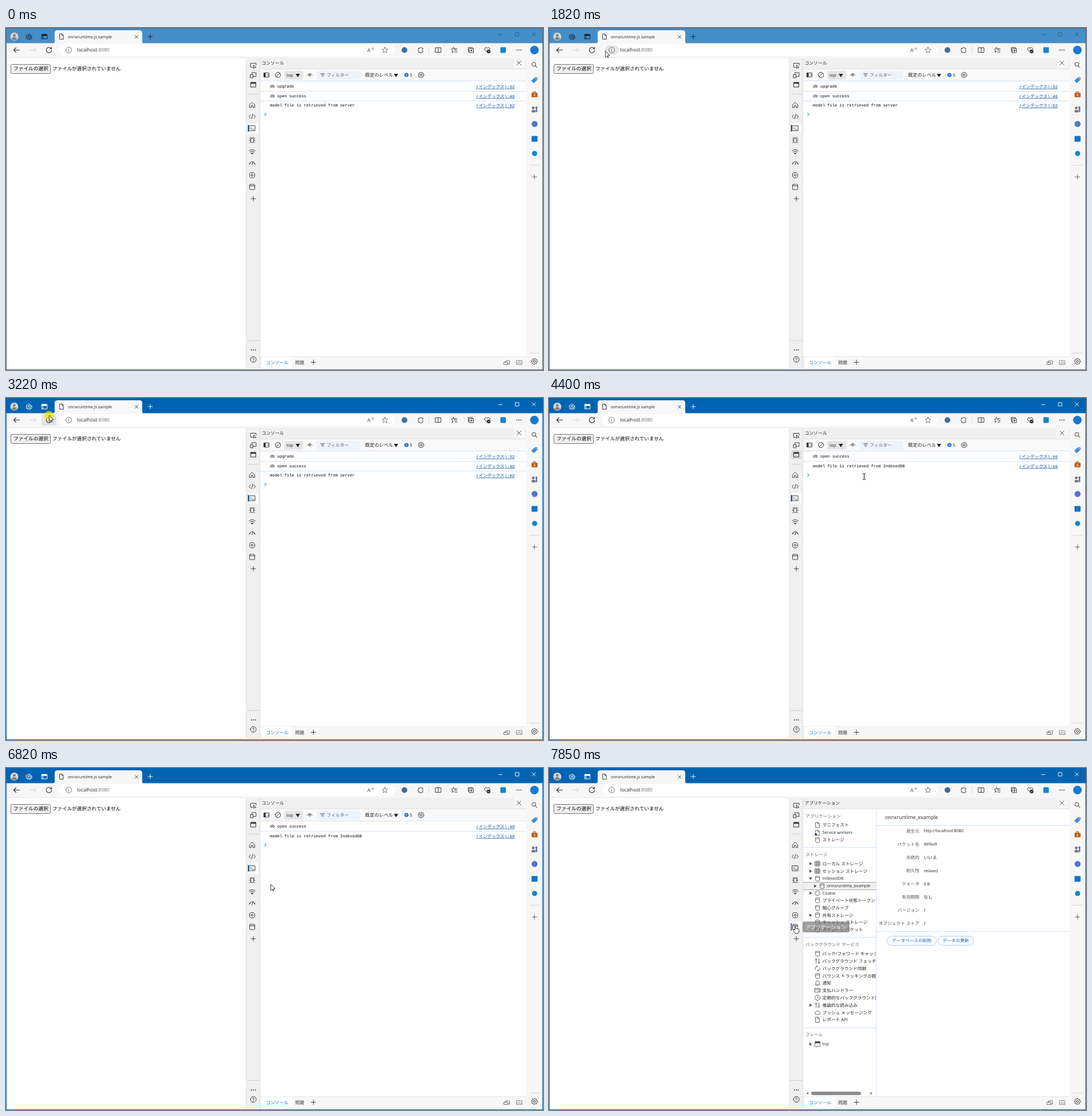
An HTML page that plays this animation: 938 by 597 pixels, repeating every 8 s.

```html
<!DOCTYPE html>
<html lang="ja">
<head>
<meta charset="utf-8">
<title>Browser storage demo</title>
<style>
html, body { margin: 0; width: 100%; height: 100%; overflow: hidden; background: #f7f7f7; }
svg { position: absolute; left: 0; top: 0; display: block; }
text { font-family: 'Open Sans', 'Noto Sans CJK JP', 'Noto Sans CJK', sans-serif; white-space: pre; text-rendering: geometricPrecision; }
.mono { font-family: 'Liberation Mono', 'Noto Sans CJK JP', 'Noto Sans CJK', monospace; }
.link { text-decoration: underline; }
.tight { font-feature-settings: 'palt'; }
</style>
</head>
<body>
<script>
const LOOP = 8000;
const INK = '#2b2b2b', BLUE = '#004f9c', LINE = '#d3e2f5', GREY = '#f0f0f0', BAR = '#f7f7f7';

const latin = s => /^[\x20-\x7e]+$/.test(s);
const box = (x, y, w, h, fill, extra = '') =>
  `<rect x="${x}" y="${y}" width="${w}" height="${h}" fill="${fill}" ${extra}/>`;
const outline = (x, y, w, h, fill, stroke, r = 0, extra = '') =>
  box(x + .5, y + .5, w - 1, h - 1, fill, `stroke="${stroke}" rx="${r}" ${extra}`);
const dot = (x, y, r, fill) => `<circle cx="${x}" cy="${y}" r="${r}" fill="${fill}"/>`;
// y is the middle of the line of text
const label = (x, y, s, size = 7.7, fill = '#222', extra = '') =>
  `<text x="${x}" y="${y + size * (latin(s) ? .33 : .37)}" font-size="${size}" fill="${fill}" ${extra}>${s}</text>`;
const icon = (x, y, d, stroke = INK, w = .9, fill = 'none') =>
  `<path transform="translate(${x} ${y})" d="${d}" fill="${fill}" stroke="${stroke}" stroke-width="${w}" stroke-linecap="round" stroke-linejoin="round"/>`;
const group = (id, ...parts) => `<g id="${id}">${parts.join('')}</g>`;
const ring = r => `M${-r} 0a${r} ${r} 0 1 0 ${2 * r} 0a${r} ${r} 0 1 0 ${-2 * r} 0`;
const frame = (w, h) => `M${-w} ${-h}h${2 * w}v${2 * h}h${-2 * w}z`;
const gear = r => {
  let d = ring(r * .36);
  for (let i = 0; i <= 32; i++) {
    const a = i * Math.PI / 16, q = i % 4 < 2 ? r : r * .78;
    d += `${i ? 'L' : 'M'}${(q * Math.cos(a)).toFixed(2)} ${(q * Math.sin(a)).toFixed(2)}`;
  }
  return d;
};

const PLUS = 'M-4 0H4M0-4V4', CROSS = 'M-3.5-3.5L3.5 3.5M3.5-3.5L-3.5 3.5';
const DOC = 'M-3-4.5H.8L3.2-2V4.5H-3zM.8-4.5V-2H3.2';
const CYL = 'M-3.5-3c0-1.9 7-1.9 7 0v6c0 1.9-7 1.9-7 0zM-3.5-3c0 1.9 7 1.9 7 0';
const GRID = frame(4, 4) + 'M-1.4-4V4M1.4-4V4M-4-1.4H4M-4 1.4H4';
const WINDOW = 'M-3.5-4.5h7q1 0 1 1v7q0 1-1 1h-7q-1 0-1-1v-7q0-1 1-1zM-4.5-2h9';
const ARROWS = 'M-2.5 4V-4L-4.5-2M-2.5-4L-.8-2M2.5-4V4L.8 2M2.5 4L4.5 2';
const SYNC = 'M-3.5 2.2A4 4 0 0 1 0-4M-1.5-5L0-4-1.5-2.5M3.5-2.2A4 4 0 0 1 0 4M1.5 5L0 4 1.5 2.5';
const BELL = 'M-4 2.5L-3 1V-1a3 3 0 0 1 6 0V1L4 2.5zM-1 4H1';
const CARD = frame(4.5, 3.2) + 'M-4.5-1h9M1.5 1.5H3';
const CLOCK = ring(4.5) + 'M0-2.5V.5H2.5';
const CLOUD = 'M-3 3a2.2 2.2 0 0 1 .2-4.2a3 3 0 0 1 5.6 0A2.2 2.2 0 0 1 3 3z';
const COOKIE = ring(4.3) + 'M-1.6-1.5h.2M1.4-1h.2M-1 1.7h.2M1.5 2h.2';

const titleBar = () => [
  box(0, 0, 938, 27, '#468ec8', 'id="strip"'),
  '<path d="M82 27q3 0 3-3V9q0-5 5-5H233q5 0 5 5V24q0 3 3 3z" fill="#f7f7f7"/>',
  dot(14.5, 15, 7, '#d9d6d3'), dot(14.5, 13, 2.4, '#87817c'),
  '<path d="M10 19.5q0-3.5 4.5-3.5t4.5 3.5q-4.5 3.5-9 0z" fill="#87817c"/>',
  group('tools',
    icon(40, 15, 'M-4.5-2L0-4.5 3-3M-4.5-2V3L-1 4.8M-1.5-.8L2-2.6 5-.8V3L2 4.8-1.5 3zM-1.5-.8L2 1 5-.8M2 1V4.8', 'currentColor'),
    icon(67, 15, 'M-4-4H4q.8 0 .8.8V4H-4.8V-3.2q0-.8.8-.8zM-2.5-1.5V4', 'currentColor', 1),
    box(62.5, 11, 9, 2.8, 'currentColor'), icon(252, 15, PLUS, 'currentColor')),
  icon(97, 15, DOC), label(108, 15.3, 'onnxruntime.js sample', 7.2),
  icon(228, 15.5, 'M-2.5-2.5L2.5 2.5M2.5-2.5L-2.5 2.5'),
  group('controls', icon(863.5, 11.5, 'M-3 0H3', 'currentColor'), icon(893, 11, frame(3, 3), 'currentColor'),
    icon(922, 11, 'M-3-3L3 3M3-3L-3 3', 'currentColor'))
].join('');

const toolbar = () => [
  box(1, 26.5, 936, 569.5, BAR),
  box(93, 28, 586, 21, '#fff', 'rx="10"'),
  box(62, 29, 26, 19, '#e3e3e3', 'rx="3" id="reloadHover"'),
  box(97, 30, 25, 17, '#e6e6e6', 'rx="8.5" id="infoHover"'),
  icon(18.5, 38.5, 'M5 0H-5M-1-4L-5 0-1 4', INK, 1.1),
  icon(47, 38.5, 'M-5 0H5M1-4L5 0 1 4', '#cfcfcf'),
  icon(75, 38.5, 'M4-2.5A4.7 4.7 0 1 0 4.7 0M4.4-5V-2.3H1.7', INK, 1.1),
  icon(109.5, 38.5, ring(5) + 'M0-.5V2.5M0-2.4V-2.3', '#666'),
  label(124, 38.5, 'localhost<tspan fill="#707070">:8080</tspan>', 8.45),
  label(631, 39, 'A', 9, '#444'), icon(639, 36, 'M0-1Q1 0 0 1M2-2Q3.7 0 2 2', '#444', .7),
  icon(662, 38.5, 'M0-5L1.5-1.7 5-1.3 2.4 1.1 3.1 4.6 0 2.8-3.1 4.6-2.4 1.1-5-1.3-1.5-1.7z', '#555', .8),
  dot(696, 38.5, 5, '#3f6f9c'),
  icon(724, 38.5, 'M-3.5-3.2H-1a1.5 1.5 0 0 1 3 0H4V-1.2a1.6 1.6 0 0 0 0 2.6V3.8H2a1.5 1.5 0 0 1-3 0H-3.5V1.5a1.5 1.5 0 0 1 0-2.8z'),
  box(738, 32, 1, 13, '#dedede'),
  icon(755, 38.5, frame(4.8, 4) + 'M0-4V4'),
  icon(783, 38.5, 'M-1.5-4.5L-.3-1.8 2-1.5M-1.5-4.5L-2.8-1.8-5-1.4-3.2.6-3.7 4-1 2.5M1-2.5H5M1 .5H5M1 3.5H5'),
  icon(812, 38.5, 'M-3 2.5H-4.5V-4.5H2.5V-3M-2.5-2.5H4.5V4.5H-2.5zM1-.8V2.8M-.8 1H2.8'),
  icon(840.5, 38.5, 'M0 3.8L-4.2-.2a2.5 2.5 0 0 1 4.2-3a2.5 2.5 0 0 1 4.2 3z'),
  dot(843, 41, 3.2, INK), icon(843, 41, 'M-1.4 0L-.3 1 1.4-1', '#fff', .8),
  box(863.5, 33.5, 9.5, 10, '#1683cf', 'rx="1"'),
  ...[892.5, 896, 899.5].map(x => dot(x, 38.5, .9, INK)),
  dot(923, 38.5, 7.5, '#1b79cf')
].join('');

const sideBar = () => [
  icon(922, 63.5, ring(3.2) + 'M2.4 2.4L5.4 5.4', '#555', 1.1),
  icon(923, 91, 'M-5 1L1-4.5 5-4.5V-.8L-1 4.8z', '#2f74c8', .6, '#3f86d8'), dot(926, 88.5, .9, '#fff'),
  icon(923, 116, 'M-2-3V-4.8H2V-3', '#8b4a20', 1.1), box(918, 113, 10.5, 8, '#c3682b', 'rx="1"'),
  box(918, 116.5, 10.5, 1, '#8b4a20'), box(922, 116, 2.4, 2.5, '#f2c48e'),
  dot(921, 139.5, 2.4, '#777'), box(918, 143, 7, 4.5, '#777', 'rx="2"'),
  dot(926.5, 139, 1.9, '#5b70b8'), box(925.5, 141, 2.4, 6, '#5b70b8'),
  dot(923.3, 167.5, 5.2, '#4f76cd'),
  box(918, 188.5, 10.5, 10, '#1573c7', 'rx="1"'),
  dot(923.3, 219, 4.5, '#1686d1'),
  box(915, 239, 17, 1, '#d6d6d6'), icon(923, 260, PLUS, '#555'),
  box(915, 567, 17, 1, '#d6d6d6'), icon(923, 582, gear(5.3))
].join('');

const page = () => [
  outline(2, 51, 418, 544, '#fff', '#e6e6e6', 4),
  outline(8, 63, 70, 17, '#efefef', '#767676', 2),
  label(13, 71, 'ファイルの選択', 8.7, '#000'),
  label(81, 71, 'ファイルが選択されていません', 8.57, '#000')
].join('');

const activityBar = () => [
  box(420, 52, 24, 543, GREY), box(443, 52, 1, 543, '#dcdcdc'),
  box(423, 91, 18, 16, '#dcdcdc', 'rx="2" id="panelHover"'),
  group('consoleTab', box(422, 166, 18, 18, '#fff'), box(422.5, 169, 1.6, 12, BLUE)),
  group('appTab', box(422, 268, 18, 18, '#fff'), box(422.5, 271, 1.6, 13, BLUE)),
  icon(432, 65.5, 'M-1 3H-4.8V-4H4.8V-.5M.5-.5V5L2 3.5H4.5z'),
  icon(432, 82.5, 'M-2.5-1V-4.5H4.8V2H.5M-4.8-1H-.5V4.5H-4.8z'),
  icon(432, 99, frame(4.3, 4), INK, 1), box(427.5, 94.8, 9, 2.4, INK),
  box(423, 115, 18, 1, '#cfcfcf'),
  icon(430, 134, 'M-4.5 0L0-4.5 4.5 0V4.8H1.5V1.2H-1.5V4.8H-4.5z'),
  icon(430, 154.5, 'M-3-3L-5.5 0-3 3M3-3L5.5 0 3 3M1-4L-1 4'),
  icon(430, 175, frame(5, 4.3) + 'M-3-1.5L-1.2 0-3 1.5M0 2H3'),
  icon(430, 195.5, 'M-2.7-1a2.7 2.7 0 0 1 5.4 0V2a2.7 2.7 0 0 1-5.4 0zM-1.5-3.3L-2.5-4.8M1.5-3.3L2.5-4.8M-2.7.5H-5M2.7.5H5M-2.7-1.5L-4.5-3.5M2.7-1.5L4.5-3.5M-2.5 3L-4.5 5M2.5 3L4.5 5'),
  icon(430, 216, 'M-5.5-1.5Q0-6 5.5-1.5M-3.7.7Q0-2.3 3.7.7M-2 2.7Q0 1 2 2.7'), dot(430, 219.6, 1, INK),
  icon(430, 236.5, 'M-5.2 1Q-3.5-3.2 0-3.2T5.2 1M-5.2 1L-3-.2M5.2 1L3-.2M-.5 2.5L1.5-2.5'),
  icon(430, 257, 'M-2.5-4.5h5l2 2v5l-2 2h-5l-2-2v-5z' + ring(1.8)),
  icon(430, 277.5, WINDOW), icon(432, 298, PLUS),
  box(421, 545, 22, 1, '#cfcfcf'),
  ...[428.5, 432, 435.5].map(x => dot(x, 562, .9, INK)),
  icon(432, 578.5, ring(5) + 'M-1.5-1.2a1.5 1.5 0 1 1 2.3 1.3Q0 .6 0 1.3M0 2.9V3')
].join('');

const consoleBar = () => [
  box(444, 72, 465, 20, '#f9f9f9'), box(444, 92, 465, 1, LINE),
  icon(455, 82, frame(4.3, 3.6)), box(450.5, 78.5, 3, 7.5, INK), icon(456, 82, 'M3-1.5L1 0 3 1.5', INK, .8),
  icon(475, 82, ring(4.7) + 'M3.2-3.2L-3.2 3.2'),
  box(486, 75, 33, 15, '#e5e5e5', 'rx="2"'), label(490, 82.5, 'top', 7.4),
  '<path d="M506 80h7.5L509.8 86zM677.5 80h7.5L681.3 86z" fill="#222"/>',
  icon(530.5, 82.5, 'M-4.5 0Q0-6 4.5 0' + ring(1.6)),
  box(543, 75, 75, 15, '#edf3fb', 'rx="2"'), icon(553, 82, 'M-3.5-2.3H3.5M-2.2 0H2.2M-1 2.3H1', '#444'),
  label(560, 82, 'フィルター', 7.8, '#5a6675'), label(627, 82, '既定のレベル', 8.2),
  dot(699.5, 82, 3.6, '#1a73d0'), icon(699.5, 82, 'M-1.4-.6H1.4M-1.4 .9H.6', '#fff', .6),
  label(705.5, 82, '5', 7.6), icon(725, 82, gear(5))
].join('');

const logs = (id, rows) => group(id, ...rows.map(([s, n], i) => {
  const y = 101.5 + 16.7 * i;
  return (i ? box(444, 93 + 17 * i, 465, 1, LINE) : '') +
    label(461, y, s, 7.05, '#000', 'class="mono"') +
    label(888.5, y + .6, `(インデックス):${n}`, 7.5, BLUE, 'class="mono link" text-anchor="end"');
}), icon(453, 101.2 + 16.6 * rows.length, 'M-1.2-2.4L1.2 0-1.2 2.4', '#3d95e6', 1.1));

const consolePanel = () => group('consolePanel',
  label(446.5, 61, 'コンソール', 7.8), consoleBar(),
  logs('firstRun', [['db upgrade', 32], ['db open success', 40], ['model file is retrieved from server', 82]]),
  logs('secondRun', [['db open success', 40], ['model file is retrieved from IndexedDB', 69]]));

// each row: y, icon, text, arrow (> closed, v open), indent
const TREE = [
  [99.5, DOC, 'マニフェスト'], [113, DOC, 'Service workers'], [125.5, CYL, 'ストレージ'],
  [167, GRID, 'ローカル ストレージ', '>'], [180, GRID, 'セッション ストレージ', '>'],
  [193, CYL, 'IndexedDB', 'v'], [206, CYL, 'onnxruntime_example', '>', 8],
  [218.5, COOKIE, 'Cookie', '>'], [231, CYL, 'プライベート状態トークン'], [244, CYL, '関心グループ'],
  [257, CYL, '共有ストレージ', '>'], [269.5, CYL, 'キャッシュ ストレージ'], [282, CYL, 'ストレージ バケット'],
  [324, CYL, 'バック/フォワード キャッシュ'], [337, ARROWS, 'バックグラウンド フェッチ'],
  [350, SYNC, 'バックグラウンド同期'], [363, CYL, 'バウンス トラッキングの軽減'],
  [375.5, BELL, '通知'], [388, CARD, '支払ハンドラー'], [401, CLOCK, '定期的なバックグラウンド同期'],
  [414, ARROWS, '推論的な読み込み', '>'], [427, CLOUD, 'プッシュ メッセージング'],
  [439.5, DOC, 'レポート API'], [482, WINDOW, 'top', '>']
];
const uiText = (x, y, s, fill, extra) => label(x, y, s, latin(s) ? 7.2 : 7.7, fill, extra);
const treeRow = ([y, shape, s, arrow, indent = 0]) => [
  arrow ? icon(457 + indent, y, arrow === '>' ? 'M-1.5-2.3L1.8 0-1.5 2.3z' : 'M-2.3-1.5H2.3L0 1.8z', '#333', .4, '#333') : '',
  icon(469 + indent, y, shape, '#444', .8),
  uiText(477.5 + indent, y, s)
].join('');

const FACTS = [['発生元', 'http://localhost:8080'], ['バケット名', 'default'], ['永続的', 'いいえ'], ['耐久性', 'relaxed'],
  ['クォータ', '0 B'], ['有効期限', 'なし'], ['バージョン', '1'], ['オブジェクト ストア', '1']];
const pill = (x, w, s) => outline(x, 293, w, 17, '#fff', '#a9cbee', 8) +
  label(x + w / 2, 301, s, 7.7, '#0b62b4', 'text-anchor="middle"');

const appPanel = () => group('appPanel',
  label(446.5, 61, 'アプリケーション'),
  box(444, 72, 465, 501, '#fff'),
  '<g clip-path="url(#tree)">',
  box(444, 199, 127, 14, '#f0f0f0'), box(444, 199, 127, 1, '#a6a6a6'), box(444, 212, 127, 1, '#a6a6a6'),
  ...[[84, 'アプリケーション'], [151, 'ストレージ'], [308, 'バックグラウンド サービス'], [465.5, 'フレーム']]
    .map(([y, s]) => label(448, y, s, 7.7, '#666')),
  ...[138, 295, 453].map(y => box(444, y, 127, 1, LINE)),
  ...TREE.map(treeRow), dot(466, 116, 2, '#333'), box(465, 478, 8, 2, '#333'),
  '</g>',
  box(571, 72, 1, 501, LINE), box(458, 565, 87, 6, '#8b8b8b', 'rx="3"'),
  '<path d="M453 565.5v5l-3.5-2.5zM561.5 565.5v5l3.5-2.5z" fill="#777"/>',
  label(587, 86.5, 'onnxruntime_example', 8.8), box(572, 100, 337, 1, LINE),
  ...FACTS.map(([k, v], i) => {
    const y = 110 + 23.05 * i;
    return uiText(647, y, k, '#555', 'text-anchor="end"') + uiText(654.5, y, v);
  }),
  box(572, 285, 337, 1, LINE), pill(590, 87, 'データベースの削除'), pill(679, 63, 'データの更新'));

const devtools = () => [
  box(444, 52, 465, 543, '#fff'), box(444, 52, 465, 20, GREY), box(444, 71, 465, 1, '#e2e2e2'),
  box(887, 52, 20, 18, BAR), icon(896, 61, CROSS, '#444'),
  consolePanel(), appPanel(),
  box(444, 573, 465, 22, BAR), box(444, 573, 465, 1, '#e4e9ef'), box(447, 574, 53, 20, '#fff'),
  label(454, 584, 'コンソール', 7.8, '#0b6cc0'), label(505, 584, '問題', 8, '#333'), icon(537, 583.5, PLUS),
  icon(875, 584, 'M-2-.5V-3H4.5V2.5H2M-5-.5H1.5V3.5H-5zM-3-.5V-2', '#555', .8),
  icon(896.5, 584, frame(4.7, 3.5) + 'M-4.5 1H4.5M-1.5-.5L0-2 1.5-.5', '#777', .8),
  activityBar()
].join('');

const overlays = () => [
  outline(0, 0, 938, 597, 'none', '#58656f', 0, 'id="edge"'),
  group('reloadTip', outline(83, 40, 203, 16, '#fff', '#555'),
    label(88, 48, 'その他のオプションを確認するには、このページを更新して待ちます', 7, '#222', 'class="tight"')),
  group('appTip', box(443, 268, 82, 19, '#6c6c6c', 'rx="3"'), label(448, 277.5, 'アプリケーション', 8.9, '#fff')),
  '<circle id="click" r="8.3" fill="#f5e000" fill-opacity=".72"/>',
  group('arrow', icon(0, 0, 'M.5.5V11L3 8.7 4.6 12 6 11.4 4.5 8.1H7.7z', '#111', .8, '#fff')),
  group('beam', icon(0, 0, 'M-2.5-5.5Q0-5.5 0-4.3Q0-5.5 2.5-5.5M0-4.3V4.3M-2.5 5.5Q0 5.5 0 4.3Q0 5.5 2.5 5.5', '#111', 1)),
  group('hand', icon(0, 0, 'M-1.2.8q0-1 1-1t1 1V5l4 .8q1.5.4 1.5 2V10q0 3-2.2 3.8H.5q-1.5-.5-2.5-2.5L-4 8q-.4-1.5 1-1.3L-1.2 7.7z', '#111', .9, '#fff'))
].join('');

document.body.innerHTML = `<svg width="938" height="597" viewBox="0 0 938 597">
<clipPath id="tree"><rect x="444" y="72" width="127" height="492"/></clipPath>` +
  titleBar() + toolbar() + sideBar() + page() + devtools() + overlays() + '</svg>';

// pointer steps: time, x, y, shape
const POINTER = [
  [600, 830, 518, 'arrow'], [800, 748, 462, 'beam'], [1000, 560, 337, 'beam'], [1200, 330, 190, 'arrow'],
  [1400, 175, 85, 'arrow'], [1600, 115, 45, 'arrow'], [1820, 98, 40, 'arrow'],
  [2220, 161, 54, 'arrow'], [2410, 112, 45, 'arrow'], [2600, 75, 30, 'arrow'],
  [4030, 215, 64, 'arrow'], [4200, 432, 98, 'arrow'], [4400, 550.5, 137, 'beam'], [4620, 727, 164, 'beam'],
  [4830, 703, 148, 'beam'], [5030, 663, 123, 'beam'],
  [5220, 610, 156, 'beam'], [5420, 530, 185, 'beam'], [5620, 468, 182, 'beam'], [5820, 441, 176, 'arrow'],
  [6440, 448, 184, 'arrow'], [6640, 462, 203, 'arrow'], [6840, 472, 225, 'arrow'], [7040, 466, 244, 'arrow'],
  [7240, 450, 258, 'arrow'], [7440, 434, 266, 'hand'], [7630, 430.5, 275, 'hand']
];
// visible spans
const SHOWN = {
  infoHover: [[1600, 2220]], reloadHover: [[2600, 4030]], reloadTip: [[3000, 3200]],
  panelHover: [[4200, 4620]], firstRun: [[0, 3410]], secondRun: [[3410, LOOP]],
  click: [[3200, 3410], [7630, 7850]], appTip: [[7630, LOOP]],
  consoleTab: [[0, 7850]], consolePanel: [[0, 7850]], appTab: [[7850, LOOP]], appPanel: [[7850, LOOP]]
};
const $ = id => document.getElementById(id);
const show = (id, on) => $(id).setAttribute('display', on ? 'inline' : 'none');

function render(t) {
  for (const id in SHOWN) show(id, SHOWN[id].some(([a, b]) => t >= a && t < b));
  const active = t >= 3200;
  $('strip').setAttribute('fill', active ? '#0063b1' : '#468ec8');
  $('edge').setAttribute('stroke', active ? '#0063b1' : '#58656f');
  $('tools').style.color = active ? '#fff' : '#10202e';
  $('controls').style.color = active ? '#fff' : '#285878';
  $('appTip').setAttribute('opacity', t < 7850 ? 1 : .65);
  const [, x = 0, y = 0, shape] = POINTER.filter(p => p[0] <= t).pop() || [];
  for (const id of ['arrow', 'beam', 'hand']) {
    show(id, id === shape);
    $(id).setAttribute('transform', `translate(${x} ${y})`);
  }
  $('click').setAttribute('cx', x);
  $('click').setAttribute('cy', y + 1);
}
const start = performance.now();
function tick() {
  render((performance.now() - start) % LOOP);
  requestAnimationFrame(tick);
}
tick();
</script>
</body>
</html>
```
